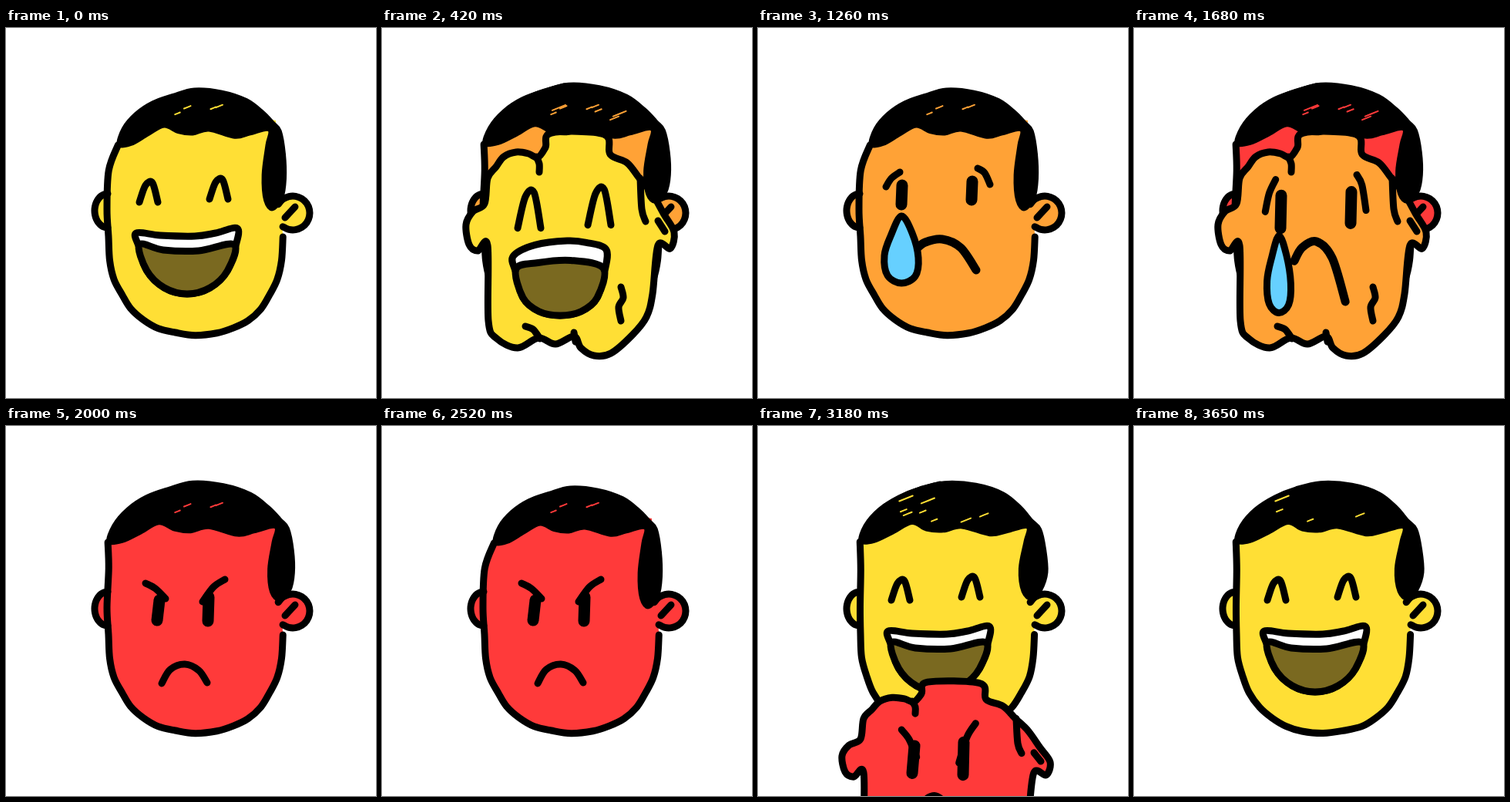
These frames come from a looping animation (480x480 px, 3.78 s). An HTML page with a canvas:

```html
<!DOCTYPE html>
<html lang="en">
<head>
<meta charset="utf-8">
<title>Melting moods</title>
<style>
  html, body { margin: 0; height: 100%; overflow: hidden; background: #fff; }
  canvas { display: block; width: 100vw; height: 100vh; }
</style>
</head>
<body>
<canvas id="stage" width="480" height="480"></canvas>
<script>
const ctx = document.getElementById('stage').getContext('2d');
ctx.lineCap = ctx.lineJoin = 'round';

// "x,y x,y ..." to a list of points
const points = text => text.split(' ').map(pair => pair.split(',').map(Number));
const shift = (p, dx, dy) => p.map(([x, y]) => [x + dx, y + dy]);

// Points along a superellipse; power 2 gives a plain ellipse
function arc(cx, cy, rx, ry, from, to, power = 2, count = 12) {
  const bend = v => Math.sign(v) * Math.abs(v) ** (2 / power);
  return Array.from({ length: count + 1 }, (_, i) => {
    const a = from + (to - from) * i / count;
    return [cx + rx * bend(Math.cos(a)), cy + ry * bend(Math.sin(a))];
  });
}

function seeded(seed) {
  let s = seed * 7919 + 17;
  return () => (s = s * 16807 % 2147483647) / 2147483647;
}

const wobble = (p, random, size) =>
  p.map(([x, y]) => [x + (random() - .5) * size, y + (random() - .5) * size]);

// Catmull-Rom curve through every point
function curve(p, closed) {
  const path = new Path2D(), n = p.length;
  const at = i => closed ? p[(i + n) % n] : p[Math.max(0, Math.min(n - 1, i))];
  path.moveTo(...p[0]);
  for (let i = 0; i < (closed ? n : n - 1); i++) {
    const [a, b, c, d] = [at(i - 1), at(i), at(i + 1), at(i + 2)];
    path.bezierCurveTo(b[0] + (c[0] - a[0]) / 6, b[1] + (c[1] - a[1]) / 6,
      c[0] - (d[0] - b[0]) / 6, c[1] - (d[1] - b[1]) / 6, ...c);
  }
  if (closed) path.closePath();
  return path;
}

function fill(path, color) {
  ctx.fillStyle = color;
  ctx.fill(path);
}

function stroke(path, width = 9, color = '#000') {
  ctx.lineWidth = width;
  ctx.strokeStyle = color;
  ctx.stroke(path);
}

const { PI } = Math;
const hairShape = points('133,150 139,128 158,107 182,91 210,80 242,73 282,76 318,87 342,106 356,121 367,133 373,160 374,190 368,213 355,226 344,215 340,185 346,150 349,131 322,138 300,142 264,132 240,137 218,136 199,127 175,139 150,150');
const jawline = arc(246, 270, 113, 128, PI, 0, 2.3, 16);
const ears = [arc(132, 237, 17, 22, 1.5 * PI, .5 * PI), arc(372, 240, 22, 22, -2.6, 2.2)];
const fold = points('362,246 375,232');

// The old face sliding off the head
const meltTop = 136, meltBottom = 425;
const melt = points('220,136 212,155 202,168 190,163 174,161 158,167 148,180 137,195 133,228 118,238 109,255 113,281 124,289 137,282 138,380 149,403 176,415 203,402 225,410 249,400 258,415 275,425 297,422 325,398 343,375 351,345 358,282 374,286 379,265 366,242 350,214 334,195 318,175 296,164 288,138');
const creases = ['200,167 204,176 204,187', '310,336 313,350 307,362 310,380', '186,387 196,391 205,403',
  '249,395 251,407', '358,250 367,264', '335,195 337,235 342,251'].map(points);

// How each kind of part moves and stretches as it melts
const soften = {
  grin: { dx: 6, dy: 23, sx: 1.25, sy: 1.85 },
  eye: { dx: 4, dy: 22, sx: 1, sy: 1.7 },
  brow: { dx: 2, dy: 21, sx: .75, sy: 2.2 },
  smile: { dx: -4, dy: 15, sx: .92, sy: 1.3, bend: 25, middle: [235, 302] },
  frown: { dx: -3, dy: 22, sx: .85, sy: 1.95 },
  tear: { dx: 2, dy: 32, sx: .7, sy: 1.15 }
};

function meltPart(p, { dx, dy, sx, sy, bend = 0, middle }, droop) {
  const mid = axis => {
    const v = p.map(q => q[axis]);
    return (Math.min(...v) + Math.max(...v)) / 2;
  };
  const [cx, cy] = middle || [mid(0), mid(1)];
  return p.map(([x, y]) => [
    x + droop * (dx + (x - cx) * (sx - 1)),
    y + droop * (dy + (y - cy) * (sy - 1) + bend * ((x - cx) / 65) ** 2)
  ]);
}

const part = (kind, shape, width = 9, color) => ({ kind, shape, width, color });
const line = (kind, text, width) => part(kind, points(text), width);
const grin = points('173,226 181,204 190,201 197,226');
const jaw = arc(235, 277, 63, 68, .1, PI - .1, 2, 6);

const moods = [
  { color: '#ffdf35', parts: [
    part('grin', grin),
    part('grin', shift(grin, 91, -4)),
    part('smile', [...points('169,266 200,269 245,270 272,266 300,260'), ...jaw], 9, '#fff'),
    part('smile', [...points('173,281 204,288 250,289 296,281'), ...jaw.slice(1, -1)], 9, '#7a6920')
  ] },
  { color: '#ffa236', parts: [
    line('brow', '166,206 173,195 184,187'),
    line('brow', '285,182 294,188 301,203'),
    line('eye', '187,204 186,229', 15),
    line('eye', '278,199 277,223', 15),
    line('frown', '205,287 217,278 239,274 263,285 283,314', 11),
    part('tear', points('186,244 172,270 164,295 168,321 186,331 204,322 208,298 200,266'), 9, '#66d0ff')
  ] },
  { color: '#ff3a3a', parts: [
    line('brow', '181,204 194,211 207,224'),
    line('brow', '284,199 269,209 255,228'),
    line('eye', '199,226 196,252', 15),
    line('eye', '263,222 262,253', 15),
    line('frown', '202,334 213,316 232,309 250,317 261,333')
  ] }
];

const durations = [130, 80, 130, 80, 80, 80, 80, 80, 130, 130, 130, 130];
const PHASE = 1260, MELT_START = 3, MELT_PEAK = 4, MELT_END = 8;

function makeHair(random, squash) {
  const shaped = hairShape.map(([x, y]) =>
    [265 + (x - 265) * squash, 140 + (y - 140) * (y < 140 ? squash : 1 / squash)]);
  return wobble(shaped, random, 2);
}

function drawHead(hair, random, color) {
  const face = [hair[0], ...wobble([[134, 185], [132, 235], ...jawline], random, 2)];
  const skin = curve(face);
  points('357,235 350,215 350,120 250,100 170,115').forEach(p => skin.lineTo(...p));
  ears.forEach(ear => fill(curve(ear), color));
  fill(skin, color);
  [...ears, face, fold].forEach(p => stroke(curve(p)));
}

function drawHair(hair, random, color, melting) {
  const path = curve(hair, true);
  fill(path, '#000');
  stroke(path, 3);
  if (melting) stroke(curve(points('165,105 200,87 236,76')));
  for (let i = 0; i < (melting ? 8 : 4); i++) {
    const x = 180 + random() * 130, y = 95 + random() * 30, length = 6 + random() * 12;
    stroke(curve([[x, y], [x + length, y - length * .4]]), 2, color);
  }
}

function drawFeatures(mood, droop, place = p => p) {
  for (const { kind, shape, width, color } of mood.parts) {
    const path = curve(meltPart(shape, soften[kind], droop).map(place), !!color);
    if (color) fill(path, color);
    stroke(path, width);
  }
}

function drawMelt(mood, index, droop) {
  const slide = 1.75 ** (index - MELT_PEAK) - 1;
  const top = meltTop + 45 * slide, bottom = meltBottom + 32 * slide;
  const place = ([x, y]) => [x, top + (y - meltTop) * (bottom - top) / (meltBottom - meltTop)];
  const body = curve(melt.map(place), true);
  fill(body, mood.color);
  stroke(body);
  creases.forEach(p => stroke(curve(p.map(place))));
  drawFeatures(mood, droop, index < MELT_PEAK ? undefined : place);
}

function draw() {
  const time = performance.now() % (PHASE * 3);
  const phase = Math.floor(time / PHASE);
  let index = 0;
  for (let rest = time % PHASE; rest >= durations[index]; index++) rest -= durations[index];

  const old = moods[phase], next = moods[(phase + 1) % 3];
  const melting = index >= MELT_START && index < MELT_END;
  const shown = index < MELT_START ? old : next;
  const droop = index && index < MELT_END ? Math.min(1, 2 ** (index - MELT_PEAK)) : 0;
  const random = seeded(1 + index % 2);
  const hair = makeHair(random, index ? 1 : .9);

  ctx.fillStyle = '#fff';
  ctx.fillRect(0, 0, 480, 480);
  drawHead(hair, random, shown.color);
  drawFeatures(shown, melting ? 0 : droop);
  if (melting) drawMelt(old, index, droop);
  drawHair(hair, random, shown.color, melting);
  requestAnimationFrame(draw);
}
draw();
</script>
</body>
</html>
```
